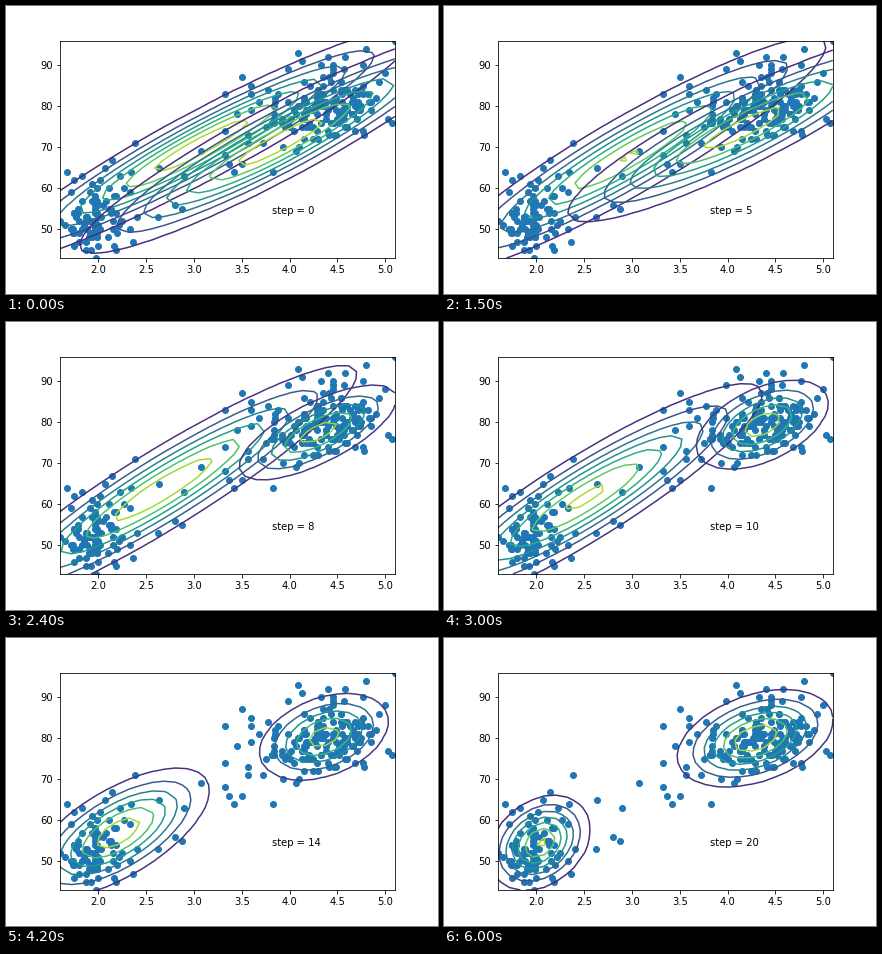
Animation of 432 by 288 pixels, one loop 6300 ms. Source, as a matplotlib script:

```python
"""Two Gaussians settling onto two clusters of points, step by step."""
import numpy as np
import matplotlib.pyplot as plt
from matplotlib.animation import FuncAnimation

STEPS = 21
XLIM, YLIM = (1.6, 5.1), (43, 96)

# Points on the rim of the clusters and between them.
RIM = [
    (1.60, 52), (1.67, 64), (1.72, 59), (1.75, 62), (1.75, 54), (1.83, 63),
    (1.75, 46), (1.80, 47), (1.87, 45), (1.92, 45), (1.98, 43), (2.02, 62),
    (2.07, 65), (2.14, 67), (2.38, 71), (2.23, 63), (2.34, 64), (2.33, 59),
    (2.27, 60), (2.36, 47), (2.40, 53), (2.33, 50), (2.19, 45), (2.16, 46),
    (2.20, 49), (2.62, 53), (2.63, 65), (2.90, 63), (2.80, 56), (2.88, 55),
    (3.07, 69), (3.32, 83), (3.33, 74), (3.33, 68), (3.37, 66), (3.42, 64),
    (3.50, 66), (3.45, 78), (3.50, 87), (3.57, 71), (3.57, 73), (3.60, 79),
    (3.60, 83), (3.60, 85), (3.83, 64), (3.68, 81), (3.72, 71), (3.75, 75),
    (3.77, 84), (3.85, 82), (3.93, 70), (4.07, 69), (4.10, 70), (3.98, 89),
    (4.09, 93), (4.13, 91), (4.40, 92), (4.33, 90), (4.45, 90), (4.58, 92),
    (4.80, 94), (4.77, 90), (5.10, 96), (5.00, 88), (4.93, 86), (5.03, 77),
    (5.07, 76), (4.78, 73), (4.77, 74), (4.90, 82),
]

# Per key step: mean x, mean y, sigma x, sigma y, correlation.
KEYS = np.array([0, 3, 5, 8, 12, 16, 20])
LOW = np.array([
    (3.074, 70.30, 1.098, 14.14, .945),
    (3.032, 69.33, 1.077, 14.38, .935),
    (2.980, 68.10, 1.035, 14.50, .928),
    (2.677, 63.70, 1.035, 15.40, .931),
    (2.374, 59.60, 0.734, 11.46, .846),
    (2.090, 55.07, 0.310, 5.85, .450),
    (2.036, 54.48, 0.263, 5.81, .285),
])
HIGH = np.array([
    (3.900, 71.28, 1.035, 13.40, .930),
    (4.025, 72.74, 0.983, 12.68, .930),
    (4.160, 74.57, 0.941, 11.70, .900),
    (4.297, 77.50, 0.444, 6.24, .720),
    (4.396, 80.42, 0.336, 5.62, .330),
    (4.313, 80.20, 0.395, 5.83, .390),
    (4.290, 79.97, 0.412, 6.00, .381),
])


def cluster(rng, n, mean, sigma, rho, reach=1.9):
    """Correlated normal points, kept within reach and on whole rows."""
    pts = rng.normal(size=(n * 4, 2))
    u, v = pts[np.hypot(*pts.T) < reach][:n].T
    x = mean[0] + sigma[0] * u
    y = mean[1] + sigma[1] * (rho * u + np.sqrt(1 - rho ** 2) * v)
    return np.column_stack([np.round(x * 60) / 60, np.round(y)])


def ease(t, vals):
    """Monotone cubic through the key values, at rest at the end."""
    h = np.diff(KEYS)
    d = np.diff(vals) / h
    m = np.zeros(len(vals))
    m[0] = d[0]
    for i in range(1, len(d)):
        if d[i - 1] * d[i] > 0:
            m[i] = 2 * d[i - 1] * d[i] / (d[i - 1] + d[i])
    i = min(np.searchsorted(KEYS, t, side="right") - 1, len(h) - 1)
    s = (t - KEYS[i]) / h[i]
    return (vals[i] * (1 + 2 * s) * (1 - s) ** 2
            + vals[i + 1] * s * s * (3 - 2 * s)
            + h[i] * (m[i] * s * (1 - s) ** 2 - m[i + 1] * s * s * (1 - s)))


def density(params):
    mx, my, sx, sy, rho = params
    u, v = (X - mx) / sx, (Y - my) / sy
    q = 1 - rho ** 2
    z = np.exp(-(u * u - 2 * rho * u * v + v * v) / (2 * q))
    return z / (2 * np.pi * sx * sy * np.sqrt(q))


rng = np.random.default_rng(7)
points = np.vstack([
    RIM,
    cluster(rng, 70, (1.97, 53.6), (.17, 5.0), .15),
    cluster(rng, 132, (4.36, 80.0), (.31, 5.0), .25),
])
X, Y = np.meshgrid(np.linspace(*XLIM, 30), np.linspace(*YLIM, 30))

plt.rcParams.update({"font.family": "DejaVu Sans", "font.size": 10})
fig, ax = plt.subplots(figsize=(6, 4), dpi=72)
fig.subplots_adjust(left=.125, right=.9, bottom=.125, top=.88)
ax.scatter(*points.T, color="#1f77b4")
ax.set(xlim=XLIM, ylim=YLIM)
ax.set_autoscale_on(False)
label = ax.text(3.82, 53.7, "")
rings = []


def draw(step):
    while rings:
        rings.pop().remove()
    for table in (LOW, HIGH):
        params = [ease(step, col) for col in table.T]
        rings.append(ax.contour(X, Y, density(params), cmap="viridis"))
    label.set_text(f"step = {step}")
    return [label]


anim = FuncAnimation(fig, draw, frames=STEPS, init_func=lambda: [label],
                     interval=300, repeat=True, repeat_delay=0)
plt.show()
```
